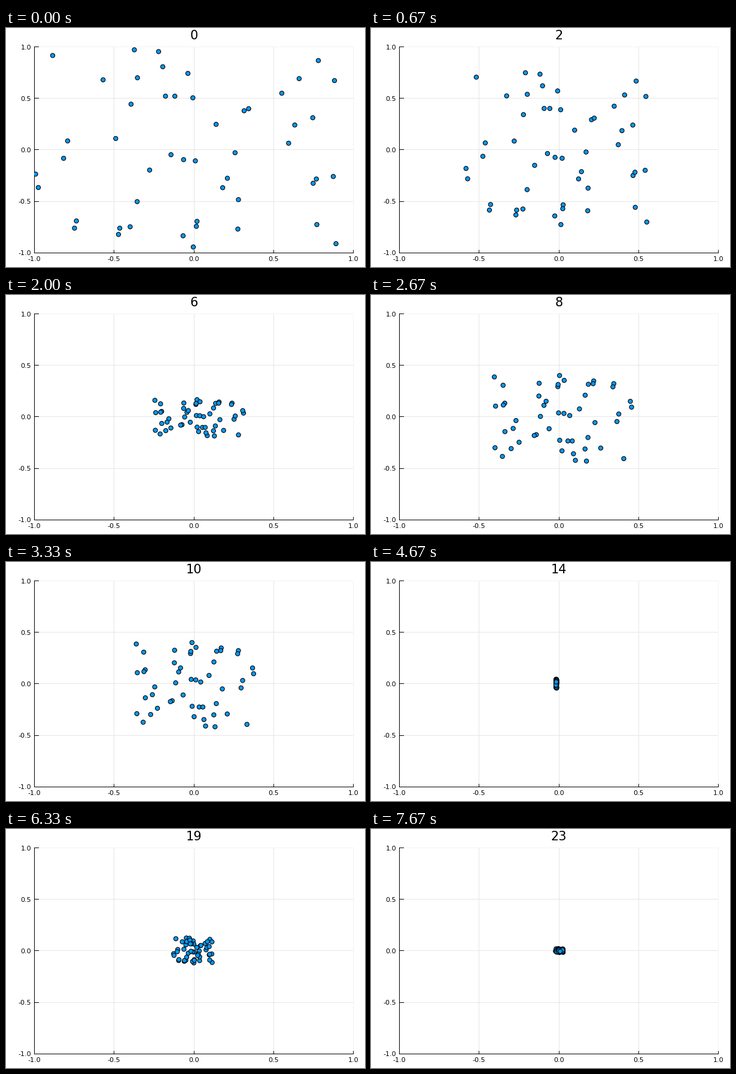
Write a matplotlib script that moves like this. It is 600 by 400 pixels and loops after 8 s.

```python
import numpy as np
import matplotlib.pyplot as plt
from matplotlib.animation import FuncAnimation
from matplotlib.patches import Rectangle
from matplotlib.path import Path

W, H, DPI = 600, 400, 100
PT = 72 / DPI
LOOP_MS, STEPS, FRAMES = 8000, 24, 400
DOTS = 50
LEFT, RIGHT, TOP, BOTTOM = 47.5, 580.5, 31.5, 376.3
PIVOT = np.array([324, 203.5])

# Outer dots of the swarm; the others lie at random between them
OUTLINE = [(49.5, 244.5), (103, 189), (78, 46), (214.5, 36.5), (255, 39.5),
           (304, 76), (398, 138.5), (522, 54.5), (549, 88), (547, 248.5),
           (551.5, 361), (519.5, 329), (387.5, 336.5), (313, 366.5),
           (188, 345.5), (114.5, 335), (54, 267)]


def make_swarm():
    rng = np.random.default_rng(7)
    tries = rng.uniform((LEFT, TOP), (RIGHT, BOTTOM), (10 * DOTS, 2))
    inside = tries[Path(OUTLINE).contains_points(tries)]
    return np.vstack([OUTLINE, inside[:DOTS - len(OUTLINE)]])


def swing(t, phase, rate, decay, drag, wobble=0):
    """Damped oscillation that starts at 1."""
    angle = phase + rate * t + wobble * (1 - np.cos(0.15 * t))
    return np.exp(-decay * t - drag * t**2) * np.cos(angle) / np.cos(phase)


def ease(t, start, length):
    u = np.clip((t - start) / length, 0, 1)
    return u * u * (3 - 2 * u)


def swarm_at(t):
    spread = [swing(t, 0.2, 0.3, 0.075, 0.0018, 0.2),
              swing(t, -0.149, 0.335, 0.06, 0.0026)]
    drift = [9 * ease(t, 10.5, 8.5) - 17.6 * ease(t, 2, 8.5),
             2 * ease(t, 3, 4) - 2 * ease(t, 8, 4)]
    return PIVOT + drift + (START - PIVOT) * spread


def line(xs, ys, color="black"):
    ax.plot(xs, ys, color=color, lw=PT, solid_capstyle="butt", snap=False)


def draw_axes():
    ticks = np.linspace(-1, 1, 5)
    tick_x = np.floor(np.linspace(LEFT, RIGHT, 5)) + 0.5
    tick_y = np.floor(np.linspace(BOTTOM, TOP, 5)) + 0.5
    base = tick_y[0]
    for value, x, y in zip(ticks, tick_x, tick_y):
        grid = "#f2f2f2" if value == 1 else "#e5e5e5"
        line([x, x], [TOP, base], grid)
        line([LEFT, RIGHT], [y, y], grid)
        ax.text(x, 390.5, f"{value:.1f}", size=8, ha="center", va="baseline")
        ax.text(42, y + 4, f"{value:.1f}", size=8, ha="right", va="baseline")
    for x, y in zip(tick_x, tick_y):
        line([x, x], [base, base - 5])
        line([LEFT, LEFT + 7.5], [y, y])
    line([LEFT, LEFT], [TOP - 0.5, base + 0.5])
    line([LEFT, RIGHT + 0.5], [base, base])


plt.rcParams["font.family"] = "DejaVu Sans"
fig = plt.figure(figsize=(W / DPI, H / DPI), dpi=DPI, facecolor="white")
ax = fig.add_axes([0, 0, 1, 1])
ax.set(xlim=(0, W), ylim=(H, 0))
ax.axis("off")
draw_axes()

START = make_swarm()
title = ax.text(314, 19, "0", size=15, ha="center", va="baseline")
dots = ax.scatter(*START.T, s=(7.2 * PT) ** 2, c=["#009afa"] * DOTS,
                  edgecolors="black", linewidths=1.1 * PT, zorder=3)
dots.set_clip_path(Rectangle((LEFT - 0.5, TOP), RIGHT - LEFT, BOTTOM - TOP,
                             transform=ax.transData))


def update(frame):
    # Each step is held for a third of a second, rounded to whole frames
    step = int((frame + 0.7) * STEPS / FRAMES)
    title.set_text(str(step))
    dots.set_offsets(swarm_at(step))
    return title, dots


anim = FuncAnimation(fig, update, frames=FRAMES, interval=LOOP_MS / FRAMES,
                     repeat=True, repeat_delay=0)
plt.show()
```
